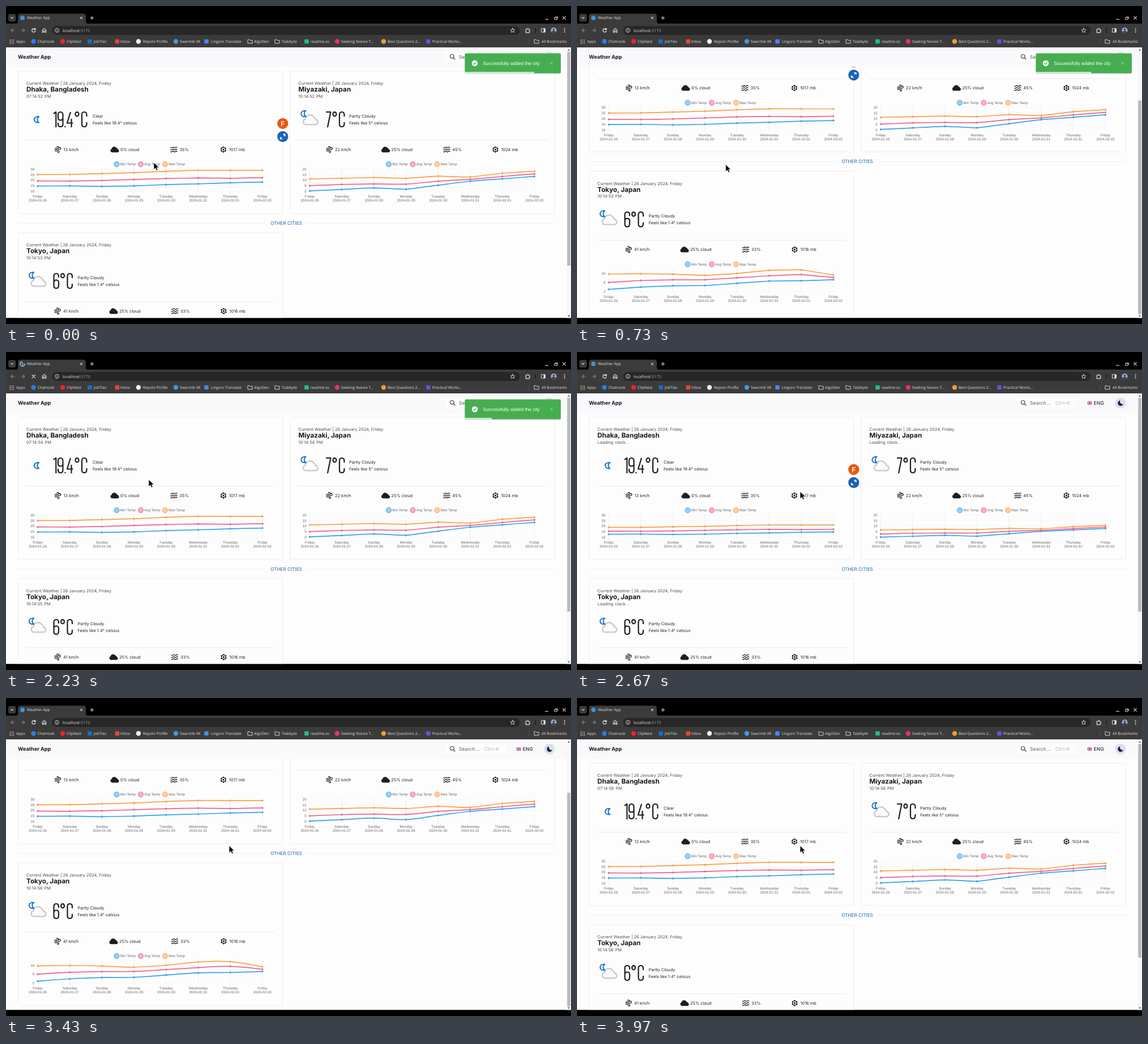
Recreate the animation shown at these times as an HTML page. Size 998 by 561 pixels, loop 4010 ms.

```html
<!DOCTYPE html>
<html lang="en">
<head>
<meta charset="utf-8">
<title>Weather App</title>
<style>
  html, body { margin: 0; width: 100%; height: 100%; overflow: hidden; background: #000; }
  svg { display: block; width: 100vw; height: 100vh; }
  text { text-rendering: geometricPrecision; white-space: pre; }
  .ui { font: 6.7px "Open Sans", sans-serif; fill: #e6e6e6; }
  .url { font-size: 7.2px; }
  .page { font: 7.4px Inter, sans-serif; fill: #25262b; }
  .soft { fill: #4e4f55; }
  .city { font-size: 11.7px; font-weight: 700; fill: #17181c; }
  .brand { font-size: 9.1px; font-weight: 700; fill: #17181c; }
  .bar { font-size: 8.4px; letter-spacing: .1px; }
  .axis { font: 6.3px "Liberation Sans", Arial, sans-serif; fill: #666; }
  .toast { font: 8.32px "Liberation Sans", Arial, sans-serif; fill: #fff; }
  .mid { text-anchor: middle; }
  .end { text-anchor: end; }
  .line { fill: none; stroke-linecap: round; stroke-linejoin: round; }
</style>
</head>
<body>
<svg id="stage" viewBox="0 0 998 561" preserveAspectRatio="none"></svg>
<script>
const LOOP = 4010;
const COLORS = ['#36a2eb', '#f5608a', '#fb9f45'];
const DAYS = ['Friday', 'Saturday', 'Sunday', 'Monday', 'Tuesday', 'Wednesday', 'Thursday', 'Friday'];
const DATES = ['01-26', '01-27', '01-28', '01-29', '01-30', '01-31', '02-01', '02-02'];
const CHART = { x: 56, step: 56.7, top: 287.5, bottom: 327 };

// series order: min, avg, max
const CITIES = [
  { name: 'Dhaka, Bangladesh', x: 0, y: 0, temp: '19.4°C', sky: 'Clear', feels: '19.4', textX: 153,
    stats: ['13 km/h', '0% cloud', '35%', '1017 mb'], statX: [91.5, 192, 296.5, 384],
    low: 10, high: 30, ticks: [10, 15, 20, 25, 30],
    series: [[14.7, 14.9, 14.4, 14.9, 16, 16.7, 17.7, 18.3],
             [19.3, 19.2, 19.7, 20.6, 21.5, 22, 21.7, 22.2],
             [25, 25.1, 25.9, 26.6, 27.9, 28.8, 28.7, 28.7]] },
  { name: 'Miyazaki, Japan', x: 480.5, y: 0, temp: '7°C', sky: 'Partly Cloudy', feels: '5', textX: 125.5,
    stats: ['22 km/h', '25% cloud', '45%', '1024 mb'], statX: [90.5, 190, 298, 384],
    low: 0, high: 20, ticks: [0, 5, 10, 15, 20],
    series: [[.4, 1.7, 3.1, 1.8, 5.5, 9.1, 11.2, 13.4],
             [5.1, 6.2, 6.6, 6.4, 9.1, 10.7, 13.3, 15.6],
             [11.1, 11.7, 12.3, 11.7, 13.6, 12.8, 16.2, 18]] },
  { name: 'Tokyo, Japan', x: 0, y: 285, temp: '6°C', sky: 'Partly Cloudy', feels: '1.4', textX: 126.5,
    stats: ['41 km/h', '25% cloud', '33%', '1016 mb'], statX: [91, 190, 298, 384.5],
    low: 2, high: 12, ticks: [2, 6, 10],
    series: [[2.9, 3.9, 4.5, 4.6, 5.6, 6.6, 6.75, 7.2],
             [6, 6.85, 7.15, 7.2, 8.05, 8.95, 9.5, 8.2],
             [9.7, 9.85, 9.65, 9.15, 10, 11.4, 11.6, 9.3]] }
];

// tall condensed numerals: [stroke path, advance]
const GLYPHS = {
  '1': ['M.5 4L4.8 1V28', 7.5],
  '4': ['M7 1L1 20.5H11.5M8.5 13V28', 14.5],
  '6': ['M9.5 8V6Q9.5 1 5.2 1T1 6V22Q1 27 5.2 27T9.5 22V17Q9.5 12.5 5.2 12.5T1 17', 12.5],
  '7': ['M1 1H9.5L4 28', 12.5],
  '9': ['M9.5 11Q9.5 15.5 5.2 15.5T1 11V6Q1 1 5.2 1T9.5 6V22Q9.5 27 5.2 27T1 22V20', 12.5],
  '.': ['M1 26V28', 3.5],
  '°': ['M1 4.8a3 3.6 0 1 0 6 0a3 3.6 0 1 0-6 0', 11.5],
  'C': ['M9.5 9V6Q9.5 1 5.2 1T1 6V22Q1 27 5.2 27T9.5 22V19', 12]
};

const text = (cls, x, y, s, extra = '') => `<text class="${cls}" x="${x}" y="${y}" ${extra}>${s}</text>`;
const rect = (x, y, w, h, fill, r = 0, extra = '') =>
  `<rect x="${x}" y="${y}" width="${w}" height="${h}" rx="${r}" fill="${fill}" ${extra}/>`;
const disc = (x, y, r, fill, extra = '') => `<circle cx="${x}" cy="${y}" r="${r}" fill="${fill}" ${extra}/>`;
const line = (d, color, w = 1, extra = '') =>
  `<path class="line" d="${d}" stroke="${color}" stroke-width="${w}" ${extra}/>`;
const group = (x, y, body, extra = '') => `<g transform="translate(${x} ${y})" ${extra}>${body}</g>`;

const cloudPath = 'M-4.3 4.5A3.1 3.1 0 0 1-4.6-1.4A4.2 4.2 0 0 1 3.2-2.3A2.7 2.7 0 0 1 5-.3A2.5 2.5 0 0 1 4.6 4.5Z';
const INK = '#1d1e22';
const gearTeeth = [...Array(6).keys()].map(i =>
  `<rect x="-1.2" y="-5.3" width="2.4" height="2" fill="${INK}" transform="rotate(${i * 60})"/>`).join('');
const STAT_ICONS = [
  line('M-5-2H0a1.7 1.7 0 1 0-1.6-2.2M-5 .2H3.4a1.9 1.9 0 1 0-1.8-2.5M-5 2.4H1a1.5 1.5 0 1 1-1.5 2', INK, 1.3),
  `<path d="${cloudPath}" fill="${INK}" transform="scale(1.15 1.1)"/>`,
  [-3.6, 0, 3.6].map(y => line(`M-5.5 ${y}q1.4 1.6 2.75 0t2.75 0t2.75 0t2.75 0`, INK, 1.3)).join(''),
  disc(0, 0, 3.8, 'none', `stroke="${INK}" stroke-width="1.3"`) + gearTeeth + disc(0, 0, 1.6, INK)
];

const moon = (x, y) => group(x, y,
  line('M4.2-5.2C-7-6.6-7 6.6 4.2 5.2C.4 2.4 .4-2.4 4.2-5.2Z', '#1976cb', 2));
const cloudOutline = group(58, 201,
  `<path d="M-9 8.2A5 5 0 0 1-9.5-1.6A8 8 0 0 1 5.5-4.5A5 5 0 0 1 8.5-.5A4.4 4.4 0 0 1 8.5 8.2Z"
    fill="#fbfbfb" stroke="#cbcbcb" stroke-width="2.4"/>`);

function bigTemp(value) {
  let x = 83.5, out = '';
  for (const ch of value) {
    const [d, advance] = GLYPHS[ch];
    out += group(x, 186, line(d, INK, 2.2, 'style="stroke-linecap:butt"'));
    x += advance;
  }
  return `<g role="img" aria-label="${value}">${out}</g>`;
}

const dayX = i => CHART.x + i * CHART.step;
const chartY = (c, v) => CHART.bottom - (v - c.low) / (c.high - c.low) * (CHART.bottom - CHART.top);

function chart(c, n) {
  let out = '';
  ['Min Temp', 'Avg Temp', 'Max Temp'].forEach((s, i) => {
    const x = [195.5, 238, 281][i];
    out += disc(x, 279.2, 4.6, COLORS[i], `fill-opacity=".5" stroke="${COLORS[i]}" stroke-width=".9"`);
    out += text('axis', x + 6.3, 281.3, s);
  });
  for (const v of c.ticks) {
    const y = chartY(c, v);
    out += line(`M53 ${y}H453`, '#f3f3ea', .6) + text('axis end', 50.3, y + 2.2, v);
  }
  DAYS.forEach((day, i) => {
    const x = dayX(i);
    out += line(`M${x} ${CHART.top}V${CHART.bottom + 3}`, '#e6e6ea', .6);
    out += text('axis mid', x, 338.2, day) + text('axis mid', x, 345.4, '2024-' + DATES[i]);
  });
  COLORS.forEach((color, i) => {
    out += line('', color, 1.7, `id="line${n}${i}"`) + line('', color, 3.4, `id="dots${n}${i}"`);
  });
  return out;
}

function card(c, n) {
  const cloudy = c.sky !== 'Clear';
  let out = rect(21, 115, 468, 251, '#fdfdfe', 2, 'stroke="#ededf1" stroke-width="1"');
  out += text('page soft', 36, 139.2, 'Current Weather | 26 January 2024, Friday');
  out += text('page city', 36, 151.2, c.name);
  out += text('page soft', 36, 161.5, '', `id="clock${n}" word-spacing=".8"`);
  out += cloudy ? cloudOutline + moon(45, 190) : moon(54, 200.3);
  out += bigTemp(c.temp);
  out += text('page', c.textX, 196.8, c.sky) + text('page', c.textX, 208.8, `Feels like ${c.feels}° celsius`);
  out += line('M36 236.7H475', '#e6e8f0', .9);
  c.stats.forEach((s, i) => {
    out += group(c.statX[i], 253.2, STAT_ICONS[i]) + text('page', c.statX[i] + 10, 256, s);
  });
  return group(c.x, c.y, out + chart(c, n));
}

const hoverButtons = `<g id="buttons">
  ${disc(488.8, 207.3, 9.6, '#e8590c')}
  ${text('page mid', 488.8, 211.6, 'F', 'style="font-size:12px;font-weight:600;fill:#fff"')}
  ${disc(488.8, 230.4, 9.6, '#1864b4')}
  ${line('M486.9 232.3L484.6 234.6M484.6 231.4V234.6H487.8M490.7 228.5L493 226.2M489.8 226.2H493V229.4', '#fff', 1.4)}
</g>`;

const tooltip = `<g id="tip">${rect(339, 226.4, 123, 16.4, '#3b3c40', 2)}
  ${text('page mid', 400.5, 237.2, '1017 millibar pressure in the air', 'style="font-size:7.1px;fill:#fff"')}</g>`;

const content = `<g id="content">${CITIES.map(card).join('')}
  ${line('M21 383H458M532 383H969', '#ebedf2', .9)}
  ${text('page mid', 495, 386, 'OTHER CITIES', 'style="font-size:8.2px;fill:#1f66ae"')}
  ${hoverButtons}${tooltip}</g>`;

const header = rect(0, 73, 990, 34.5, '#f9f9fc') + text('page brand', 21, 93.2, 'Weather App') +
  rect(776, 81, 106, 18, '#fdfdfe', 2) +
  disc(787.8, 88.8, 3.3, 'none', 'stroke="#444" stroke-width="1.2"') + line('M790.3 91.3L793 94', '#444', 1.3) +
  text('page bar', 800, 92.9, 'Search...', 'style="fill:#5c5d63;letter-spacing:.2px"') +
  text('page bar', 845, 92.9, 'Ctrl+K', 'style="fill:#b3b4ba"') +
  rect(901.7, 87.2, 7.8, 5.8, '#28357c') +
  line('M901.9 87.4L909.3 92.8M909.3 87.4L901.9 92.8', '#fff', 1) +
  line('M902 90.1H909.2M905.6 87.5V92.7', '#fff', 2.2) + line('M902 90.1H909.2M905.6 87.5V92.7', '#d22f3f', 1.1) +
  text('page bar', 912.8, 93.1, 'ENG', 'style="font-weight:500"') +
  disc(960, 90, 9.6, '#dde0e7') +
  '<path d="M959.3 85.6A4.7 4.7 0 1 0 964.6 91.4A4.3 4.3 0 0 1 959.3 85.6Z" fill="#14274a"/>';

const toast = `<g id="toast">
  ${rect(810, 84.2, 170, 36, '#000', 2, 'opacity=".08"')}${rect(810.5, 83.6, 169.5, 35.2, '#46ae50', 2)}
  ${disc(828, 101, 5.2, '#fff')}${line('M825.6 101.2L827.3 102.9L830.5 99.5', '#46ae50', 1.3)}
  ${text('toast', 842.5, 104, 'Successfully added the city')}
  ${line('M961.6 99.1L965.4 102.9M965.4 99.1L961.6 102.9', '#a6d9aa', 1)}
  ${rect(810.5, 116.2, 1, 2.6, '#fff', 0, 'id="progress" opacity=".75"')}</g>`;

const scrollbar = rect(990, 73, 8, 478, '#f7f7f8') +
  '<path d="M992 78.7h4l-2-2.7zM992 545.8h4l-2 2.7z" fill="#555"/>' +
  rect(991.3, 81, 5.6, 377, '#b9b9bb', 0, 'id="thumb"');

const folder = x => line(`M${x - 4} 65.4V59.4H${x - 1}L${x} 60.5H${x + 4}V65.4Z`, '#d6d6d6', 1);
const BOOKMARKS = [
  [48.5, 55.5, 'Chatnook', '#2b7de9'], [100, 107, 'ClipNest', '#f0232b'],
  [148, 155, 'JobTies', '#1a6ec0', 1], [196.5, 202, 'Inbox', '#e3463a', 1],
  [234, 242, 'Repolo Profile', '#f1f1f1'], [300, 307, 'Swarmle XK', '#4a95dc'],
  [354, 362, 'Lingoro Translate', '#4a86ec', 1], [431, 438, 'AlgoDen'], [479, 487, 'Taskbyte'],
  [531, 538, 'readme.so', '#1fc08a', 1], [585, 592, 'Seeking Novice T...', '#e0356e'],
  [667, 674, 'Best Questions 2...', '#e8a033'], [746, 753, 'Practical Works...', '#6b50d8', 1]
];
const bookmarks = BOOKMARKS.map(([ix, tx, label, color, square]) =>
  (!color ? folder(ix) : square ? rect(ix - 3.8, 58.7, 7.6, 7.6, color, 1) : disc(ix, 62.5, 4.2, color)) +
  text('ui', tx, 64.9, label)).join('');

let appsGrid = '';
for (let i = 0; i < 9; i++)
  appsGrid += rect(6.4 + i % 3 * 2.9, 59.2 + (i / 3 | 0) * 2.9, 1.8, 1.8, ['#e8a94a', '#d9674f', '#6ea8e8'][i % 3]);

const browser = rect(0, 0, 998, 73, '#000') + rect(4, 14, 13.5, 13.5, '#3b3b3b', 4) +
  line('M8.8 19.8L10.8 21.8L12.8 19.8', '#e3e3e3', 1.1) +
  '<path d="M18 31Q21 31 21 27V18Q21 13.5 25.5 13.5H136.5Q141 13.5 141 18V27Q141 31 144 31Z" fill="#3b3b3b"/>' +
  rect(0, 31, 998, 42, '#3b3b3b') +
  disc(29, 21, 4, '#3f92d2', 'id="favicon"') +
  line('M29 16.8A4.2 4.2 0 1 1 24.8 21', '#dfe6ec', 1.2, 'id="spinner"') +
  text('ui', 37, 23.3, 'Weather App') +
  line('M131 19L135 23M135 19L131 23', '#e6e6e6', 1) + line('M149 21H154.6M151.8 18.2V23.8', '#e6e6e6', 1.1) +
  line('M952.5 23.5H957.5', '#e6e6e6', 1.2) + line('M969 20.5H973V24H969ZM970.5 19H974.3V22.5', '#e6e6e6', .9) +
  line('M983.7 18.7L988.3 23.3M988.3 18.7L983.7 23.3', '#e6e6e6', 1.1) +
  line('M15 43H9M11.8 40.2L9 43L11.8 45.8M27 43H33M30.2 40.2L33 43L30.2 45.8', '#858585', 1.1) +
  `<g id="reload">${line('M51.4 41.2A3.1 3.1 0 1 0 51.9 43.8M51.9 39.3V41.7H49.5', '#f0f0f0', 1.2)}</g>` +
  line('M46.2 40.4L51.4 45.6M51.4 40.4L46.2 45.6', '#f0f0f0', 1.3, 'id="stop"') +
  line('M64.3 42.4L67.5 39.6L70.7 42.4V46.4H68.7V43.8H66.3V46.4H64.3Z', '#e6e6e6', 1.1) +
  rect(81.5, 35.3, 826, 15.6, '#272727', 7.8) +
  disc(90, 43, 3.6, 'none', 'stroke="#e3e3e3" stroke-width=".9"') + line('M90 42.7V44.9M90 41.1V41.2', '#e3e3e3', 1) +
  text('ui url', 100, 45.6, 'localhost<tspan fill="#a5a5a5">:5173</tspan>') +
  line('M895 39.2L896.1 41.8L898.9 42L896.8 43.9L897.4 46.6L895 45.2L892.6 46.6L893.2 43.9L891.1 42L893.9 41.8Z', '#dedede', .9) +
  line('M918.2 41H920.2A1.2 1.2 0 0 1 922.6 41H924.4V42.8A1.2 1.2 0 0 1 924.4 45.1V46.8H918.2Z', '#e6e6e6', 1.2) +
  line('M935.3 38.5V47.5', '#111', 1) +
  rect(945.5, 39.8, 7, 6.4, 'none', .5, 'stroke="#e6e6e6"') + rect(949.6, 39.8, 2.9, 6.4, '#e6e6e6') +
  disc(967.5, 43, 5, '#9fb2cc') + disc(967.5, 41.6, 1.8, '#39445a') +
  '<path d="M964 46.5Q964 43.6 967.5 43.6T971 46.5Q969.5 48 967.5 48T964 46.5Z" fill="#39445a"/>' +
  [40, 43, 46].map(y => disc(986.6, y, .9, '#e6e6e6')).join('') +
  appsGrid + text('ui', 18, 64.9, 'Apps') + bookmarks +
  line('M924 58V67', '#5c5c5c', .8) + folder(937) + text('ui', 946, 64.9, 'All Bookmarks');

const cursor = '<path id="cursor" d="M0 0V12.6L3 10L5.2 14.2L7.4 13.1L5.3 9.1H9.4Z" fill="#0a0a0a" stroke="#fff" stroke-width=".7"/>';

document.getElementById('stage').innerHTML =
  rect(0, 0, 998, 561, '#000') + rect(0, 73, 998, 477.5, '#fdfdfd') +
  '<clipPath id="view"><rect x="0" y="73" width="990" height="477.5"/></clipPath>' +
  `<g clip-path="url(#view)">${content}${header}${toast}</g>` +
  `${scrollbar}${rect(0, 550.5, 998, 10.5, '#000')}${browser}${cursor}`;

const el = id => document.getElementById(id);
const show = (id, on) => el(id).setAttribute('visibility', on ? 'visible' : 'hidden');

// keys are [time, ...values]; eased between neighbours
function track(keys, t) {
  let i = 0;
  while (i < keys.length - 2 && t >= keys[i + 1][0]) i++;
  const a = keys[i], b = keys[i + 1];
  const p = Math.min(1, Math.max(0, (t - a[0]) / (b[0] - a[0])));
  const e = p * p * (3 - 2 * p);
  return a.slice(1).map((v, k) => v + (b[k + 1] - v) * e);
}
const SCROLL = [[0, 0], [180, 0], [460, 109], [720, 109], [1020, 0], [2949, 0], [3249, 109], [3600, 109], [3900, 0]];
const POINTER = [[0, 261, 276], [200, 262.5, 279.5], [1000, 262.5, 279.5], [1370, 39, 55], [1500, 47, 42],
  [1880, 47, 42], [2230, 252, 225], [2650, 394, 246], [2950, 393.5, 258], [3150, 394, 260.5]];

function curve(pts, k) {
  let d = `M${pts[0]}`;
  const slope = i => {
    const a = pts[Math.max(0, i - 1)], b = pts[Math.min(pts.length - 1, i + 1)];
    return [(b[0] - a[0]) * k / 2, (b[1] - a[1]) * k / 2];
  };
  for (let i = 1; i < pts.length; i++) {
    const [p, q, s, e] = [pts[i - 1], pts[i], slope(i - 1), slope(i)];
    d += `C${p[0] + s[0]} ${p[1] + s[1]} ${q[0] - e[0]} ${q[1] - e[1]} ${q}`;
  }
  return d;
}

let chartState = '';
function drawCharts(grow, tension) {
  const state = grow + '/' + tension;
  if (state === chartState) return;
  chartState = state;
  CITIES.forEach((c, n) => c.series.forEach((values, i) => {
    const pts = values.map((v, k) => [dayX(k), chartY(c, c.low + (v - c.low) * grow)]);
    el(`line${n}${i}`).setAttribute('d', curve(pts, tension));
    el(`dots${n}${i}`).setAttribute('d', pts.map(p => `M${p}h.01`).join(''));
  }));
}

function clock(n, t) {
  if (t >= 2420 && t < 3400) return 'Loading clock...';
  const first = n === 2 ? 53 : 52, tick = n === 2 ? 800 : 900;
  const sec = t >= 3400 ? 56 : first + (t >= tick) + (t >= tick + 1000);
  return `${n ? '10' : '07'}:14:${sec} PM`;
}

function draw(t) {
  const [scroll] = track(SCROLL, t), [x, y] = track(POINTER, t);
  el('content').setAttribute('transform', `translate(0 ${-scroll})`);
  el('thumb').setAttribute('y', 81 + scroll * .79);
  el('cursor').setAttribute('transform', `translate(${x} ${y})`);
  el('progress').setAttribute('width', Math.max(0, 122.5 - t * .0337));
  show('toast', t < 2420);
  show('buttons', t < 1150 || (t > 2520 && t < 3320));
  show('tip', t > 2720 && t < 3120);

  const loading = t > 1640 && t < 2420;
  show('stop', loading);
  show('reload', !loading);
  show('spinner', loading);
  el('favicon').setAttribute('r', loading ? 2.4 : 4);
  el('spinner').setAttribute('transform', `rotate(${t * .36} 29 21)`);

  const p = t < 2420 ? 1 : Math.min(1, Math.max(0, (t - 2470) / 1000));
  drawCharts(1 - (1 - p) ** 4, t > 3300 && t < 3580 ? .42 : .1);
  CITIES.forEach((c, n) => {
    const s = clock(n, t), node = el('clock' + n);
    if (node.textContent !== s) node.textContent = s;
  });
}

const start = performance.now();
function frame() {
  draw((performance.now() - start) % LOOP);
  requestAnimationFrame(frame);
}
frame();
</script>
</body>
</html>
```
